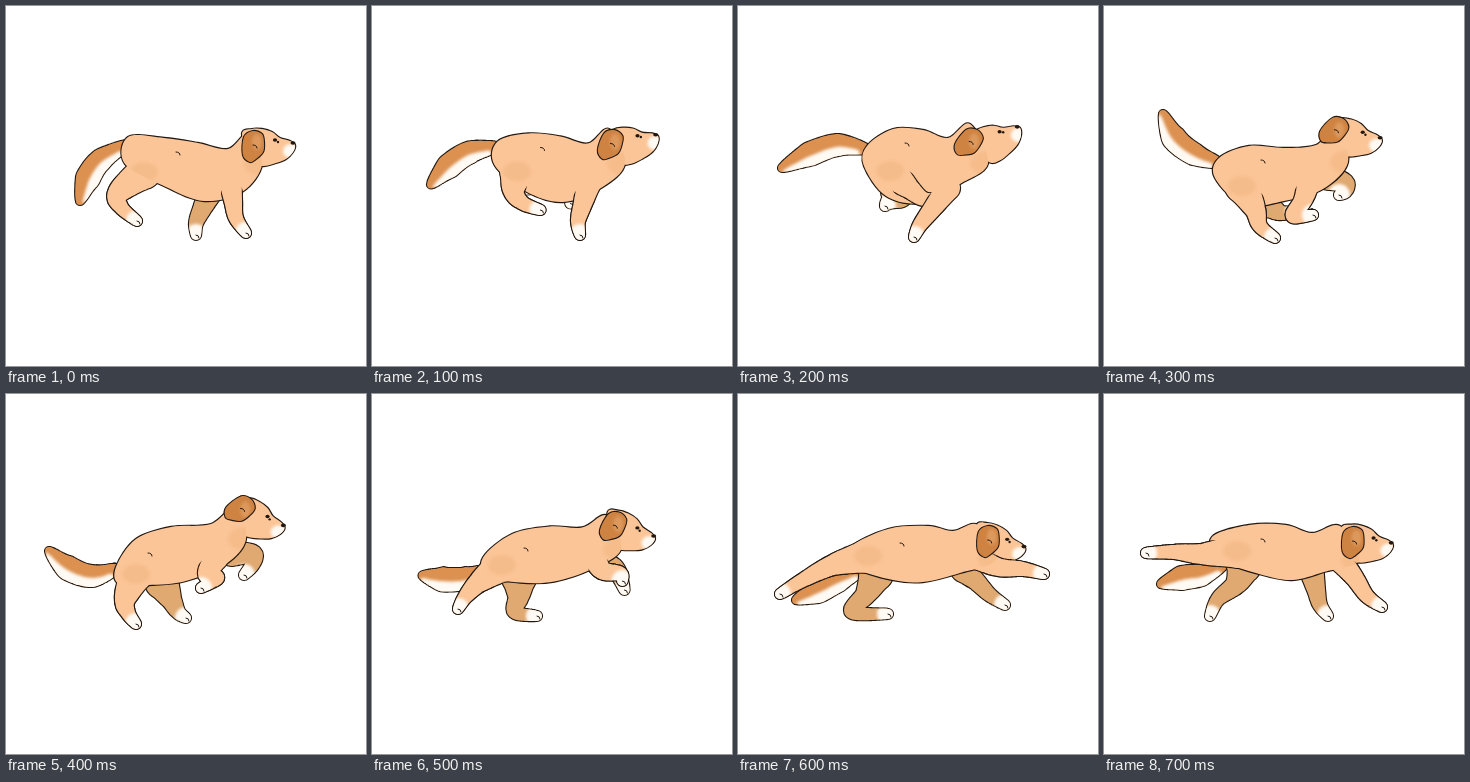
Recreate the animation shown at these times as an HTML page with a canvas. Size 360 by 360 pixels, loop 800 ms.

```html
<!DOCTYPE html>
<html lang="en">
<meta charset="utf-8">
<title>Running dog</title>
<style>
html, body { margin: 0; height: 100%; overflow: hidden; background: #fff; }
canvas { display: block; width: 100vw; height: 100vh; object-fit: contain; }
</style>
<canvas id="stage"></canvas>
<script>
const STEP = 100, INK = '#211812', COAT = '#fcc597', FAR = '#dfa971',
  TAIL = '#dc9150', EAR = '#cf8342', SHADE = '#eeb27c', WHITE = '#fffaf4';

// Half widths from root to tip
const HIND = [17, 10, 7, 5], FRONT = [12, 9, 7, 5], BRUSH = [5, 11, 12, 4];

const pairs = text => text.split(' ').map(p => p.split(',').map(Number));

// head: x, y, tilt, ear angle; the rest are points, limbs from root to tip
function pose(head, torso, tail, hind, front, farHind, farFront) {
  return [head, ...[torso, tail, hind, front, farHind, farFront].map(pairs)];
}
const mix = (a, b) => Array.isArray(a) ? a.map((v, i) => mix(v, b[i])) : (a + b) / 2;

const land = pose([260, 140, 0, 0],
  '122,131 158,132 192,137 222,143 242,128 256,158 236,186 198,195 160,181 119,158',
  '120,139 95,154 82,172 74,195',
  '138,166 112,187 115,201 131,215', '224,172 227,194 230,212 240,227',
  '150,158 157,160 163,162 168,164', '205,185 196,203 190,217 190,229');

const gather = pose([256, 135, -25, 35],
  '129,140 155,123 185,124 210,132 232,118 250,157 222,178 184,197 148,190 126,160',
  '128,143 100,139 72,148 44,162',
  '152,165 171,182 186,193 206,193', '210,182 194,203 182,219 176,231',
  '160,185 155,192 150,196 147,200', '215,160 212,162 209,164 207,166');

const cross = pose([249, 131, 8, 40],
  '115,152 145,140 180,142 212,139 232,122 244,156 219,183 180,195 140,199 111,172',
  '115,157 90,148 70,132 59,108',
  '138,180 151,203 156,220 171,232', '206,172 199,194 189,210 209,209',
  '152,190 168,202 178,207 192,206', '225,172 241,177 241,185 235,189');

const rear = pose([251, 125, 20, 50],
  '110,173 130,145 165,133 205,130 230,112 240,145 220,170 180,187 142,191 113,190',
  '110,175 86,182 62,174 43,157',
  '130,180 119,205 122,219 130,230', '210,164 201,180 211,184 195,194',
  '156,188 165,205 172,218 180,224', '226,160 247,160 246,171 238,181');

const stretch = pose([259, 149, 14, 0],
  '112,154 150,135 190,132 215,137 240,131 258,165 222,179 185,188 155,186 118,174',
  '122,177 100,187 80,197 58,206',
  '130,162 95,171 65,186 42,200', '235,162 260,173 285,175 306,180',
  '138,180 128,200 114,218 150,220', '225,176 238,187 252,201 267,211');

const reach = pose([260, 149, 6, 0],
  '108,143 145,131 182,131 208,139 236,132 255,166 220,178 188,186 155,180 115,165',
  '118,172 97,181 78,184 57,190',
  '133,157 98,160 70,158 42,159', '235,165 250,183 263,202 278,213',
  '140,172 132,190 114,205 106,222', '208,178 212,195 216,211 224,222');

const run = [land, mix(land, gather), gather, cross, rear, mix(rear, stretch), stretch, reach];

const SKULL = pairs('-24,-12 -14,-17 -4,-17 6,-14 14,-8 24,-5 29,-1 27,6 20,13 10,17 -3,20 -14,16');
const FLAP = pairs('-12,5 -3,-1 6,2 8,11 7,20 0,27 -6,30 -13,23');
const PIVOT = [-10, -14];

const canvas = document.getElementById('stage');
const ctx = canvas.getContext('2d');
const scale = Math.max(1, devicePixelRatio || 1);
canvas.width = canvas.height = 360 * scale;

// Catmull-Rom control points for the segment from b to c
const handles = (a, b, c, d) => [0, 1].map(k =>
  [b[k], b[k] + (c[k] - a[k]) / 6, c[k] - (d[k] - b[k]) / 6, c[k]]);

function blob(pts) {
  const path = new Path2D(), at = i => pts[(i + pts.length) % pts.length];
  path.moveTo(...pts[0]);
  pts.forEach((_, i) => {
    const [x, y] = handles(at(i - 1), at(i), at(i + 1), at(i + 2));
    path.bezierCurveTo(x[1], y[1], x[2], y[2], x[3], y[3]);
  });
  return path;
}

function turn([x, y], deg, [ox, oy]) {
  const a = deg * Math.PI / 180, c = Math.cos(a), s = Math.sin(a);
  return [ox + x * c - y * s, oy + x * s + y * c];
}

// Point on a four-point limb, t from 0 to 3
function along(pts, t) {
  const i = Math.min(2, Math.floor(t)), u = t - i, v = 1 - u;
  const at = k => pts[Math.min(3, Math.max(0, k))];
  return handles(at(i - 1), at(i), at(i + 1), at(i + 2)).map(([a, b, c, d]) =>
    v * v * v * a + 3 * v * v * u * b + 3 * v * u * u * c + u * u * u * d);
}

// Tapering limb as a chain of discs; grow widens it, shift moves it sideways
function limb(pts, widths, grow = 0, from = 0, shift = 0) {
  const path = new Path2D();
  for (let t = from; t < 3.01; t += 0.03) {
    const i = Math.min(2, Math.floor(t));
    const w = widths[i] + (widths[i + 1] - widths[i]) * (t - i);
    let [x, y] = along(pts, Math.min(t, 3));
    if (shift) {
      const [px, py] = along(pts, Math.max(0, t - 0.1));
      const len = Math.hypot(x - px, y - py) || 1;
      [x, y] = [x + (y - py) / len * w * shift, y - (x - px) / len * w * shift];
    }
    path.moveTo(x + w + grow, y);
    path.arc(x, y, w + grow, 0, 7);
  }
  return path;
}

function fill(path, color) {
  ctx.fillStyle = color;
  ctx.fill(path);
}

function soft(path, color, inside, alpha = 1) {
  ctx.save();
  ctx.clip(inside);
  ctx.filter = `blur(${1.6 * scale}px)`;
  ctx.globalAlpha = alpha;
  fill(path, color);
  ctx.restore();
}

function disc(x, y, rx, ry = rx) {
  const path = new Path2D();
  path.ellipse(x, y, rx, ry, 0, 0, 7);
  return path;
}

function tick([x, y], dx, dy) {
  ctx.beginPath();
  ctx.moveTo(x, y);
  ctx.quadraticCurveTo(x + dx, y, x + dx, y + dy);
  ctx.stroke();
}

function leg(pts, widths, color, inkFrom) {
  const shape = limb(pts, widths);
  fill(limb(pts, widths, 1.1, inkFrom), INK);
  fill(shape, color);
  const [x, y] = pts[3];
  soft(disc(x, y, 11), WHITE, shape);
  tick([x, y], 3, 3);
}

function draw([head, torso, tail, hind, front, farHind, farFront]) {
  const [hx, hy, tilt, flap] = head;
  const place = p => turn(p, tilt, [hx, hy]);
  const skull = blob(SKULL.map(place));
  const ear = blob(FLAP.map(p => turn(p, flap, place(PIVOT))));
  const body = blob(torso);

  ctx.setTransform(scale, 0, 0, scale, 0, 0);
  fill(disc(180, 180, 400), '#fff');
  ctx.strokeStyle = INK;
  ctx.lineCap = ctx.lineJoin = 'round';

  const brush = limb(tail, BRUSH);
  fill(limb(tail, BRUSH, 1.1), INK);
  fill(brush, TAIL);
  soft(limb(tail, BRUSH, -3, 0.4, 0.9), WHITE, brush);

  ctx.lineWidth = 1;
  leg(farHind, HIND, FAR, 0);
  leg(farFront, FRONT, FAR, 0);

  // Ink first, then colour, so the near parts share one outline
  ctx.lineWidth = 2.3;
  ctx.stroke(body);
  ctx.stroke(skull);
  fill(limb(hind, HIND, 1.1), INK);
  fill(limb(front, FRONT, 1.1), INK);
  fill(body, COAT);
  fill(skull, COAT);
  ctx.lineWidth = 1;
  leg(hind, HIND, COAT, 0.7);
  leg(front, FRONT, COAT, 0.7);

  soft(disc(...hind[0], 14, 10), SHADE, body, 0.45);
  soft(disc(...torso[5], 18, 12), SHADE, body, 0.4);
  tick([torso[1][0] + 12, torso[1][1] + 14], 4, 3);

  soft(disc(...place([25, 5]), 8, 7), WHITE, skull);
  ctx.lineWidth = 2.2;
  ctx.stroke(ear);
  fill(ear, EAR);
  soft(disc(...turn([1, 10], flap, place(PIVOT)), 5, 8), '#e3a268', ear, 0.7);
  ctx.lineWidth = 1;
  tick(turn([-3, 13], flap, place(PIVOT)), 4, 3);
  fill(disc(...place([9, -6]), 2.1, 1.7), INK);
  fill(disc(...place([12, -4]), 1.2), INK);
  fill(disc(...place([27, -3]), 2.5, 1.8), INK);
}

let shown = -1;
function play() {
  const i = Math.floor(performance.now() / STEP) % run.length;
  if (i !== shown) draw(run[shown = i]);
  requestAnimationFrame(play);
}
play();
</script>
</html>
```
